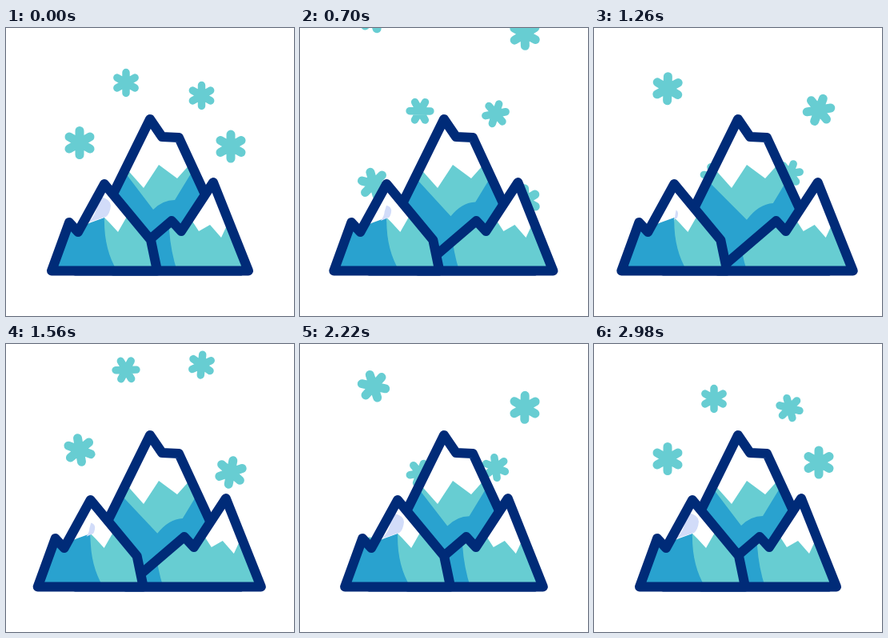
Write an HTML page that moves like this. It is 360 px wide and 360 px high and loops after 3000 ms.

```html
<!DOCTYPE html>
<html lang="en">
<head>
<meta charset="utf-8">
<title>Snowy mountains</title>
<style>
@property --spread { syntax: "<number>"; inherits: true; initial-value: 0; }
@property --fall { syntax: "<number>"; inherits: true; initial-value: 0; }
@property --turn { syntax: "<angle>"; inherits: true; initial-value: 0deg; }

html, body { margin: 0; width: 100%; height: 100%; overflow: hidden; background: #fff; }
svg {
  display: block; width: 100vw; height: 100vh;
  --navy: #002b78; --blue: #29a2cf; --teal: #67cdd2;
  animation: spread 3s cubic-bezier(.33, 0, .67, 1) infinite;
}
@keyframes spread {
  0%, 78.67%, 100% { --spread: 0; }
  39.33% { --spread: 1; }
}

.line {
  fill: none; stroke: var(--navy); stroke-width: 12;
  stroke-linejoin: round; stroke-linecap: round;
}
.snow { fill: #fff; }
.teal { fill: var(--teal); }
.blue { fill: var(--blue); }

.left { transform: translateX(calc(var(--spread) * -23px)); }
.right { transform: translateX(calc(var(--spread) * 21px)); }
.cast { transform: translateX(calc(var(--spread) * -44px)); }
.glint {
  fill: #d2dcf9; transform-origin: 127px 238px;
  transform: scale(calc(1 - var(--spread) * .82), calc(1 - var(--spread) * .62));
}
.shade { animation: shade 3s cubic-bezier(.33, 0, .67, 1) infinite; }
@keyframes shade {
  0%, 78.67%, 100% { d: path("M130 156 L184 227 Q196 215 211 215 L236 174 L330 303 L80 303 Z"); }
  39.33% { d: path("M117 166 L191 240 Q206 220 224 219 L247 181 L330 303 L80 303 Z"); }
}

/* Flakes share one curve; each starts and stops a little later. */
.flakes g { animation: 3s cubic-bezier(.33, .08, .67, .7) infinite; }
.flakes use {
  transform: translate(var(--x), calc(var(--y) + var(--fall) * 417px))
    rotate(var(--turn)) scale(var(--size, 1));
}
.flakes .a { --x: 92px; animation-name: fall-a; }
.flakes .b { --x: 150px; --size: .86; animation-name: fall-b; }
.flakes .c { --x: 244.5px; --size: .86; animation-name: fall-c; }
.flakes .d { --x: 281px; animation-name: fall-d; }
@keyframes fall-a {
  0%, 4% { --fall: 0; --turn: 0deg; }
  92%, 100% { --fall: 1; --turn: 360deg; }
}
@keyframes fall-b {
  0%, 8.33% { --fall: 0; --turn: 0deg; }
  96.33%, 100% { --fall: 1; --turn: 360deg; }
}
@keyframes fall-c {
  0%, 12.33% { --fall: 0; --turn: 0deg; }
  100% { --fall: .996; --turn: 347deg; }
}
@keyframes fall-d {
  0% { --fall: 0; --turn: 0deg; }
  88%, 100% { --fall: 1; --turn: 360deg; }
}
</style>
</head>
<body>
<svg viewBox="0 0 360 360">
  <defs>
    <path id="flake" d="M0 -15V15M-13 -7.5L13 7.5M-13 7.5L13 -7.5"
      fill="none" stroke="#67cdd2" stroke-width="11" stroke-linecap="round"/>
    <path id="mid" d="M180 114L195 136L216 137L293 303.5H86.5Z"/>
    <path id="near-left" d="M57 303.5L79 243L90 255L123 195L181 265L189 303.5Z"/>
    <path id="near-right" d="M134 303.5L207 241L219 254L259 193L303 303.5Z"/>
    <clipPath id="mid-clip"><use href="#mid"/></clipPath>
    <clipPath id="left-clip"><use href="#near-left"/></clipPath>
    <clipPath id="right-clip"><use href="#near-right"/></clipPath>
    <clipPath id="sky"><path d="M0 0H360V303H0Z"/></clipPath>
  </defs>

  <g class="flakes" clip-path="url(#sky)">
    <g class="a">
      <use href="#flake" style="--y:143.5px"/><use href="#flake" style="--y:-65px"/><use href="#flake" style="--y:-273.5px"/>
    </g>
    <g class="b">
      <use href="#flake" style="--y:68.5px"/><use href="#flake" style="--y:-140px"/><use href="#flake" style="--y:-348.5px"/>
    </g>
    <g class="c">
      <use href="#flake" style="--y:84.5px"/><use href="#flake" style="--y:-124px"/><use href="#flake" style="--y:-332.5px"/>
    </g>
    <g class="d">
      <use href="#flake" style="--y:148px"/><use href="#flake" style="--y:-60.5px"/><use href="#flake" style="--y:-269px"/>
    </g>
  </g>

  <g clip-path="url(#mid-clip)">
    <path class="teal" d="M60 100H320V304H60Z"/>
    <path class="blue shade" d="M130 156L184 227Q196 215 211 215L236 174L330 303L80 303Z"/>
    <path class="snow" d="M140 100V164L172 200L191 171L214 188L240 159V100Z"/>
  </g>
  <use href="#mid" class="line"/>

  <g class="right">
    <g clip-path="url(#right-clip)">
      <path class="teal" d="M100 180H320V304H100Z"/>
      <path class="blue cast" d="M100 200H204V252Q206 280 214 304H100Z"/>
      <path class="snow" d="M219 190V220L241 254L255 246L269 262L284 230V190Z"/>
    </g>
    <use href="#near-right" class="line"/>
  </g>

  <g class="left">
    <g clip-path="url(#left-clip)">
      <path class="snow" d="M50 180H200V304H50Z"/>
      <path class="teal" d="M123 237L129 243L140 255L152 234L200 220V304H120Z"/>
      <path class="blue" d="M50 220H80L92 249Q108 242 123 237Q122 276 139 304H50Z"/>
      <path class="glint" d="M118 211Q131 214 131 222Q130 232 125 236L103 243Q113 232 113 224Z"/>
    </g>
    <use href="#near-left" class="line"/>
  </g>
</svg>
</body>
</html>
```
